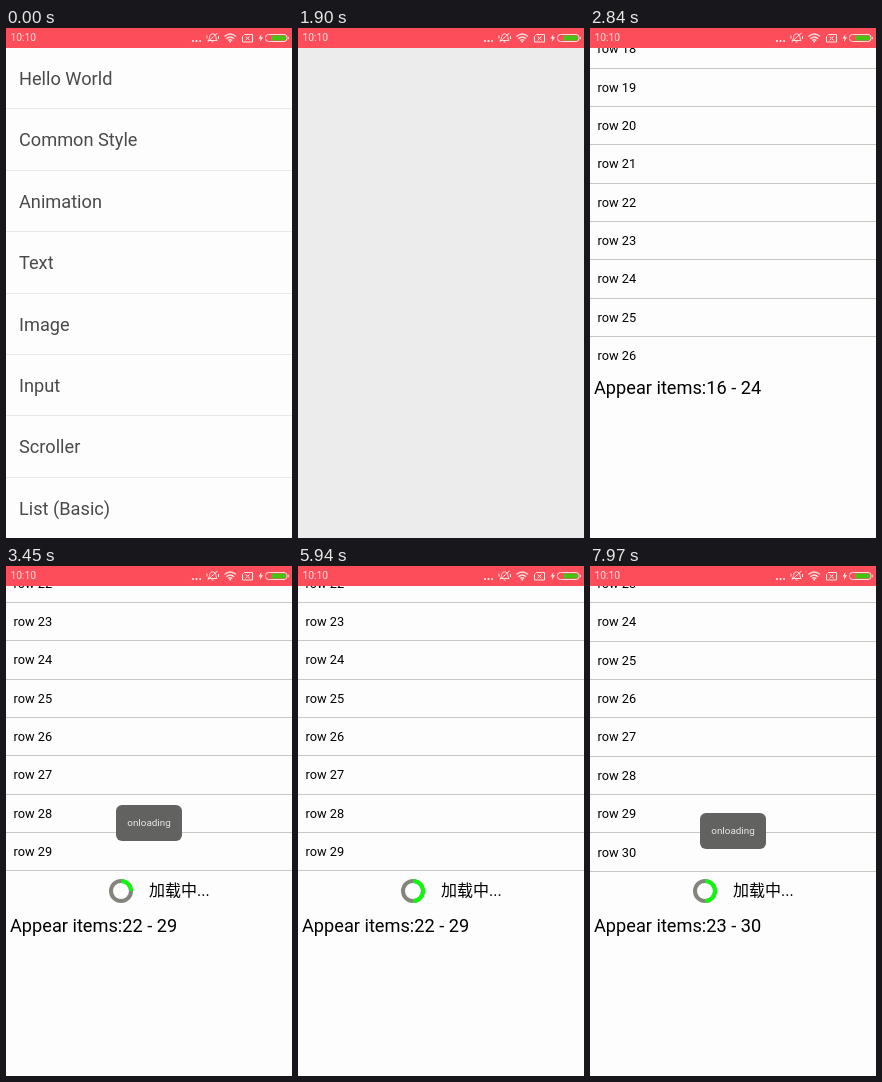
An HTML page that plays this animation: 286 by 510 pixels, repeating every 8 s.

```html
<!DOCTYPE html>
<html lang="en">
<head>
<meta charset="utf-8">
<title>List loading demo</title>
<style>
  html, body { margin: 0; width: 100%; height: 100%; overflow: hidden; }
  body { font-family: Roboto, "Noto Sans CJK SC", "Noto Sans CJK", sans-serif; }
  #stage { position: relative; width: 286px; height: 510px; overflow: hidden; background: #ececec; }
  #stage div { position: absolute; box-sizing: border-box; white-space: nowrap; }
  #status { left: 0; top: 0; width: 286px; height: 20px; background: #fe4d5a; }
  #status span { position: absolute; left: 4.5px; top: 0; font-size: 10.3px; line-height: 20px; color: #ffe8e4; }
  #status svg { position: absolute; left: 0; top: 0; }
  #menu, #page { left: 0; top: 20px; width: 286px; height: 490px; overflow: hidden; background: #fdfdfd; }
  .item { left: 0; width: 286px; height: 61.4px; padding-left: 13px; font-size: 18.2px; line-height: 62px;
    color: #4a4a4a; border-bottom: 1px solid #e8e8e4; }
  #list { left: 0; top: 0; width: 286px; height: 318px; overflow: hidden; }
  #rows { left: 0; top: 0; width: 286px; }
  .row { left: 0; width: 286px; height: 38.35px; padding-left: 7.5px; font-size: 12.8px; line-height: 38px;
    color: #000; border-bottom: 1px solid #c8c8c4; }
  #loader { left: 0; width: 286px; height: 40px; }
  #loader svg { position: absolute; left: 102px; top: 6.5px; }
  #loader span { position: absolute; left: 143px; top: 7px; font-size: 16px; line-height: 24px; }
  #label { left: 4px; top: 328px; font-size: 18.2px; line-height: 24px; color: #000; }
  #toast { left: 110px; top: 247px; width: 66px; height: 36px; border-radius: 6px; background: #626260;
    color: #e8e8e4; font-size: 9.9px; line-height: 36px; text-align: center; }
</style>
</head>
<body>
<div id="stage">
  <div id="page">
    <div id="list">
      <div id="rows">
        <div id="loader">
          <svg width="26" height="26" viewBox="-13 -13 26 26" fill="none" stroke-width="4">
            <circle r="10" stroke="#84847c"/>
            <circle id="arc" r="10" stroke="#0bfa0b" pathLength="360" transform="rotate(-90)"/>
          </svg>
          <span>加载中...</span>
        </div>
      </div>
    </div>
    <div id="label"></div>
  </div>
  <div id="menu"></div>
  <div id="toast">onloading</div>
  <div id="status">
    <span>10:10</span>
    <svg width="286" height="20" fill="none" stroke="#ffe0da" stroke-width="1">
      <g fill="#ffe8e4" stroke="none">
        <circle cx="187" cy="13" r="1.1"/><circle cx="190.5" cy="13" r="1.1"/><circle cx="194" cy="13" r="1.1"/>
        <path d="M255.5 6 252.5 10.5H254.5L253.8 14 257 9.3H255Z"/>
      </g>
      <path d="M202 12.5H211C209.6 11 210.3 8.5 209 6.9 207.5 5.2 204.8 5.5 204 7.5 203.4 9.3 203.5 11.3 202 12.5ZM205.5 14H207.5M201 7.5V10.5M212.5 8V11M201.5 14 211.5 5"/>
      <path d="M218.5 8.6Q224.2 3.2 230 8.6M220.4 10.7Q224.2 7.2 228.1 10.7M222.3 12.6Q224.2 10.8 226.2 12.6" stroke-width="1.4"/>
      <circle cx="224.2" cy="13.7" r=".9" fill="#ffe8e4" stroke="none"/>
      <path d="M238.5 6.5H246.5V14H236.5V8.5ZM239.5 8.3 243.7 12.3M243.7 8.3 239.5 12.3"/>
      <rect x="259.5" y="6.5" width="21.5" height="7" rx="3"/>
      <rect x="265" y="7.5" width="15" height="5" rx="2" fill="#45c414" stroke="none"/>
      <path d="M282.3 8.8V11.2"/>
    </svg>
  </div>
</div>
<script>
const LOOP = 8000, ROW = 38.35, VIEW = 318, ITEM = 61.4;
const ADDED = 6300;                       // the extra row arrives
const $ = id => document.getElementById(id);
const clamp = x => Math.min(1, Math.max(0, x));
const span = (t, a, b) => clamp((t - a) / (b - a));
const mix = (a, b, p) => a + (b - a) * p;
const smooth = p => (1 - Math.cos(Math.PI * p)) / 2;
const easeOut = p => 1 - (1 - p) * (1 - p);

function add(parent, cls, text, top) {
  const el = document.createElement('div');
  el.className = cls;
  el.textContent = text;
  el.style.top = top + 'px';
  parent.append(el);
  return el;
}

['Hello World', 'Common Style', 'Animation', 'Text', 'Image', 'Input', 'Scroller', 'List (Basic)']
  .forEach((name, i) => add($('menu'), 'item', name, i * ITEM));
const rows = Array.from({ length: 31 }, (_, i) => add($('rows'), 'row', 'row ' + i, i * ROW));

const rowCount = t => t < ADDED ? 30 : 31;

// A drag turning into a fling, a pull that reveals the loader, then a second pull
function scrollAt(t) {
  if (t < 2550) return 147 * span(t, 2470, 2550);
  if (t < 2620) return mix(147, 332, span(t, 2550, 2620));
  return mix(332, 832, easeOut(span(t, 2620, 3060)))
    + 33 * smooth(span(t, 3060, 3250))
    + ROW * smooth(span(t, 7020, 7290));
}

// Appear events reach the label a little late
function labelAt(t) {
  const late = t - 70, s = scrollAt(late);
  const last = Math.min(rowCount(late) - 1, Math.floor((s + VIEW) / ROW));
  return `Appear items:${Math.floor(s / ROW)} - ${last}`;
}

// Rises from below, overshoots, settles, then sinks away
function toastAt(t) {
  const start = t < 6500 ? 3300 : 7290, dt = t - start;
  const out = start === 3300 ? span(t, 5350, 5750) : 0;
  const y = dt < 150 ? mix(45, -8, easeOut(clamp(dt / 150))) : -8 * (1 - smooth(span(dt, 170, 430)));
  return { y: y + 25 * out * out, alpha: clamp(dt / 110) * (1 - out) };
}

function arcAt(t) {
  const step = t < 6500 ? (t - 3145) / 92.25 : (t - 7365) / 100;
  return Math.max(0, Math.floor(step)) % 12 * 30;
}

function draw(t) {
  const slide = smooth(span(t, 1590, 1890));
  $('menu').style.transform = `translateX(${-Math.round(286 * slide)}px)`;
  $('page').style.visibility = t < 1990 ? 'hidden' : 'visible';

  $('rows').style.transform = `translateY(${-Math.round(scrollAt(t))}px)`;
  rows[30].style.display = rowCount(t) > 30 ? '' : 'none';
  $('loader').style.top = rowCount(t) * ROW + 'px';
  $('label').textContent = labelAt(t);

  const arc = arcAt(t);
  $('arc').style.visibility = arc && t >= 1990 ? 'visible' : 'hidden';
  $('arc').setAttribute('stroke-dasharray', `${arc} 360`);

  const toast = toastAt(t);
  $('toast').style.opacity = toast.alpha;
  $('toast').style.transform = `translateY(${toast.y.toFixed(2)}px)`;
}

const begin = performance.now();
function tick() {
  draw((performance.now() - begin) % LOOP);
  requestAnimationFrame(tick);
}
tick();
</script>
</body>
</html>
```
